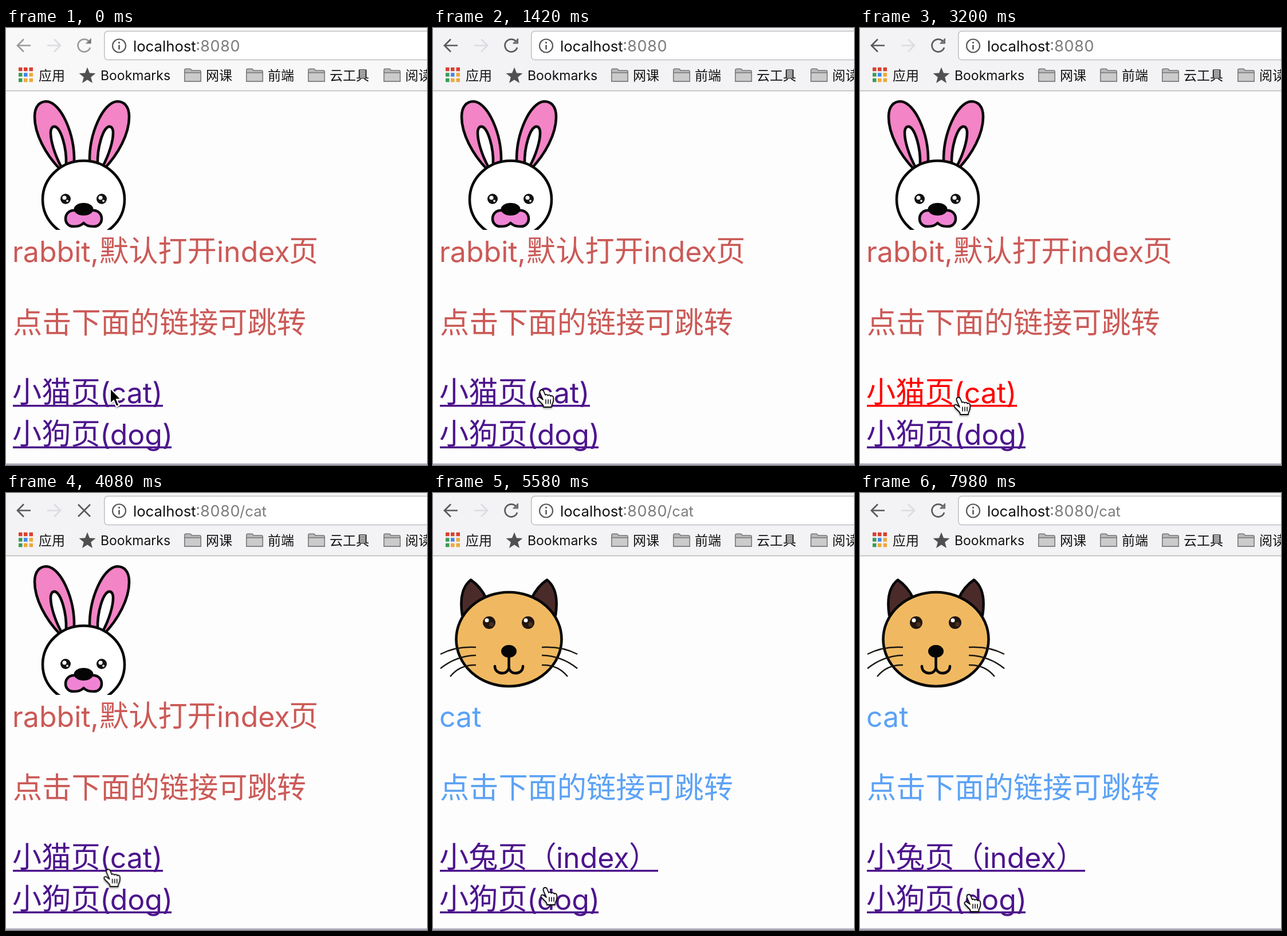
Write an HTML page that moves like this. It is 735 by 762 pixels and loops after 8 s.

```html
<!DOCTYPE html>
<html lang="zh-CN">
<head>
<meta charset="utf-8">
<title>localhost:8080</title>
<style>
html, body { margin: 0; width: 100%; height: 100%; overflow: hidden; background: #fdfdfd; }
svg { display: block; width: 735px; height: 762px; }
text { font-family: Inter, "Noto Sans CJK SC", "Noto Sans CJK", sans-serif; white-space: pre; }
.page text { font-size: 50px; }
.page .zh { font-family: "Noto Sans CJK SC", "Noto Sans CJK", sans-serif; font-size: 51.2px; }
.link { fill: #4d158c; }
.chrome text { font-size: 23px; fill: #111; }
.chrome .url { font-size: 25.7px; }
.chrome .port { font-size: 27px; font-variant-numeric: tabular-nums; }
.chrome .dim { fill: #7c7c7c; }
.chrome .label { font-weight: 500; }
.ink { stroke: #080808; stroke-width: 4.6; stroke-linecap: round; stroke-linejoin: round; }
.icon { fill: none; stroke: #5a5a5a; stroke-width: 2.7; }

/* Timed states, 80 ms per percent */
.bar, .nav, .pressed, .timed, .hand { animation: 8s step-end infinite; }
.bar { animation-name: bar; }
.nav { animation-name: nav; }
.pressed { animation-name: press; }
.pointer { animation-name: pointer; }
.idle { animation-name: idle; }
.loading { animation-name: loading; }
.home { animation-name: home; }
.cat { animation-name: cat; }
.path { animation-name: path; }
.hand { animation-name: hand, move; animation-timing-function: step-end, ease-in-out; }
@keyframes bar { 0% { fill: #f8f8f8; } 6.25% { fill: #f3f3f5; } }
@keyframes nav { 0% { stroke: #9b9b9b; } 6.25% { stroke: #5a5a5a; } }
@keyframes press { 0%, 43.75% { fill: #4d158c; } 35% { fill: #f00; } }
@keyframes pointer { 0% { opacity: 1; } 6.25% { opacity: 0; } }
@keyframes hand { 0% { opacity: 0; } 6.25% { opacity: 1; } }
@keyframes idle { 0%, 65% { opacity: 1; } 43.75% { opacity: 0; } }
@keyframes loading { 0%, 65% { opacity: 0; } 43.75% { opacity: 1; } }
@keyframes path { 0% { opacity: 0; } 43.75% { opacity: 1; } }
@keyframes home { 0% { opacity: 1; } 65% { opacity: 0; } }
@keyframes cat { 0% { opacity: 0; } 65% { opacity: 1; } }
@keyframes move {
  0%, 19% { transform: translate(181px, 629px); }
  29%, 47% { transform: translate(163px, 642px); }
  58%, 71% { transform: translate(187px, 686px); }
  83.75% { transform: translate(185px, 694px); }
  97%, 100% { transform: translate(181px, 698px); }
}
</style>
</head>
<body>
<svg viewBox="0 0 735 762">
  <defs>
    <clipPath id="photo"><rect y="110" width="265" height="242"/></clipPath>
    <filter id="shadow" x="-30%" y="-30%" width="160%" height="170%">
      <feDropShadow dx="0" dy="2" stdDeviation="1.5" flood-opacity=".35"/>
    </filter>
    <g id="folder" stroke="#777" stroke-width="1.5">
      <path d="M.8 22.5V3Q.8 .8 3 .8H10Q12 .8 13 3.5H27Q29.2 3.5 29.2 6V22.5Z" fill="#b9b9b9"/>
      <path d="M.8 7.5H29.2V22.5H.8Z" fill="#cbcbcb"/>
    </g>
    <g id="rabbit-ear" class="ink">
      <path d="M94 246C69 220 50 185 50 155C50 135 60 128 71 128C96 130 120 184 119 233Z" fill="#f384c6"/>
      <path d="M97 243C84 219 78 196 78 183C78 175 81 171 86 172C96 176 106 208 105 238Z" fill="#fff"/>
    </g>
    <g id="rabbit-eye">
      <circle r="9" fill="#111"/>
      <circle cx="-2" cy="-2" r="3.6" fill="#fff"/>
      <circle cx="3" cy="3.5" r="2" fill="#ddd"/>
    </g>
    <path id="cat-ear" class="ink" d="M51 213C46 180 54 161 66 151.500Q83 163 93 184Z" fill="#4b2b2a"/>
    <g id="cat-eye">
      <circle r="11" fill="#21150f"/>
      <circle cx="4" cy="3" r="4" fill="#46301f"/>
      <circle cx="-4" cy="-4" r="3.5" fill="#fff"/>
    </g>
    <path id="whiskers" d="M13 281Q40 267 75 269M13 306Q40 284 75 283M30 320Q47 299 75 300" fill="none" stroke="#1c1712" stroke-width="2.4"/>
  </defs>

  <rect width="735" height="762" fill="#fdfdfd"/>

  <g class="chrome">
    <rect class="bar" width="735" height="109"/>
    <path d="M0 109.500H735" stroke="#b8b8b8" stroke-width="1.5"/>
    <path class="icon nav" d="M43 30.500H20M31 19.500L20 30.500L31 41.500"/>
    <path class="icon" style="stroke:#dcdce2" d="M72 30.500H95M84 19.500L95 30.500L84 41.500"/>
    <g class="timed idle">
      <path class="icon nav" d="M145 23.500A11 11 0 1 0 147 34"/>
      <path class="icon nav" stroke-linejoin="round" d="M148.500 18V27H139.500Z" style="fill:#777;stroke-width:1"/>
    </g>
    <path class="icon timed loading" d="M126 20L147 41M147 20L126 41"/>

    <rect x="171.800" y="5.500" width="600" height="50" rx="6" fill="#fff" stroke="#bebec2" stroke-width="1.5"/>
    <circle class="icon" cx="197.500" cy="31" r="11.500" style="stroke-width:2.2"/>
    <path d="M197.500 24V27M197.500 29.500V37.500" stroke="#555" stroke-width="2.6"/>
    <text class="url" x="222" y="40.500">localhost</text>
    <text class="port dim" x="331.500" y="40.500">:8080</text>
    <text class="url dim timed path" x="408" y="40.500">/cat</text>

    <g stroke-width="6.5">
      <path d="M22 72H28.500M31 72H37.500M40.500 72H47" stroke="#d8402f"/>
      <path d="M22 81.500H28.500M22 91H28.500" stroke="#3a9b56"/>
      <path d="M31 81.500H37.500" stroke="#4387e8"/>
      <path d="M40.500 81.500H47M31 91H37.500M40.500 91H47" stroke="#eda83a"/>
    </g>
    <path d="M142 68.500L146 78.500L156.500 79L148.200 85.800L151 96L142 90.200L133 96L135.800 85.800L127.500 79L138 78.500Z" fill="#505050"/>
    <use href="#folder" x="311" y="70.500"/>
    <use href="#folder" x="419" y="70.500"/>
    <use href="#folder" x="527" y="70.500"/>
    <use href="#folder" x="659" y="70.500"/>
    <text class="label" x="57" y="91">应用</text>
    <text x="165" y="91">Bookmarks</text>
    <text class="label" x="349" y="91">网课</text>
    <text class="label" x="457" y="91">前端</text>
    <text class="label" x="565" y="91">云工具</text>
    <text class="label" x="697" y="91">阅读</text>
  </g>

  <g class="page timed home" fill="#cb5a57">
    <g clip-path="url(#photo)">
      <use href="#rabbit-ear"/>
      <use href="#rabbit-ear" transform="translate(265) scale(-1 1)"/>
      <ellipse class="ink" cx="135.500" cy="299" rx="71.500" ry="67.500" fill="#fff"/>
      <use href="#rabbit-eye" x="104" y="298"/>
      <use href="#rabbit-eye" x="167" y="298"/>
      <path class="ink" d="M119 318C99 318 99 347 119 346Q130 346 135.500 340Q141 346 152 346C172 347 172 318 152 318Z" fill="#f084d4"/>
      <ellipse cx="135.500" cy="316" rx="17" ry="11" fill="#050505"/>
    </g>
    <text x="11" y="407.500">rabbit,</text>
    <text class="zh" x="163" y="407">默认打开</text>
    <text x="368" y="407.500">index</text>
    <text class="zh" x="494" y="407">页</text>
    <text class="zh" x="12" y="531.500">点击下面的链接可跳转</text>
    <g class="pressed">
      <text class="zh" x="11" y="653">小猫页</text>
      <text x="164" y="653.500">(cat)</text>
      <rect x="12" y="657" width="262" height="3.5"/>
    </g>
  </g>

  <g class="page timed cat" fill="#5ca2f5">
    <use href="#cat-ear"/>
    <use href="#cat-ear" transform="translate(265) scale(-1 1)"/>
    <ellipse class="ink" cx="132.500" cy="255" rx="92" ry="82" fill="#f0b961"/>
    <use href="#cat-eye" x="98" y="226"/>
    <use href="#cat-eye" x="166" y="226"/>
    <use href="#whiskers"/>
    <use href="#whiskers" transform="translate(265) scale(-1 1)"/>
    <ellipse cx="132.500" cy="276" rx="13.500" ry="11" fill="#050505"/>
    <path class="ink" d="M132.500 286V303M108 302C108 318 132.500 318 132.500 303C132.500 318 157 318 157 302" fill="none"/>
    <text x="11" y="407.500">cat</text>
    <text class="zh" x="12" y="531.500">点击下面的链接可跳转</text>
    <g class="link">
      <text class="zh" x="11" y="653">小兔页（</text>
      <text x="215" y="653.500">index</text>
      <text class="zh" x="342" y="653">）</text>
      <rect x="12" y="657" width="381" height="3.5"/>
    </g>
  </g>

  <g class="page link">
    <text class="zh" x="11" y="726">小狗页</text>
    <text x="164" y="726.500">(dog)</text>
    <rect x="12" y="729.500" width="277" height="3.5"/>
  </g>
  <path d="M0 760.500H735" stroke="#74728f" stroke-width="1.7"/>

  <g class="timed pointer">
    <path transform="translate(182 628)" filter="url(#shadow)" d="M0 0V27L6 21.500L10.500 32L15.500 30L11 19.500H19Z" stroke="#fff" stroke-width="2"/>
  </g>
  <g class="hand">
    <g filter="url(#shadow)" stroke="#111" stroke-width="1.8" stroke-linecap="round" stroke-linejoin="round">
      <path fill="#fff" d="M9 2C5 2 5 6 6.500 9L11 19L6 15.500C2 13 0 17 3 20L10 27Q12 29 12 32H26Q26 28 28 25Q30 20 29 15C28.500 11.500 25 12 24.500 13C23.500 10 20 10.500 19.500 12C18.500 9.500 15.500 10 15 11L12 4Q11 2 9 2Z"/>
      <path d="M16 19V26M20 19V26M24 19V26" stroke-width="1.6"/>
    </g>
  </g>
</svg>
</body>
</html>
```
